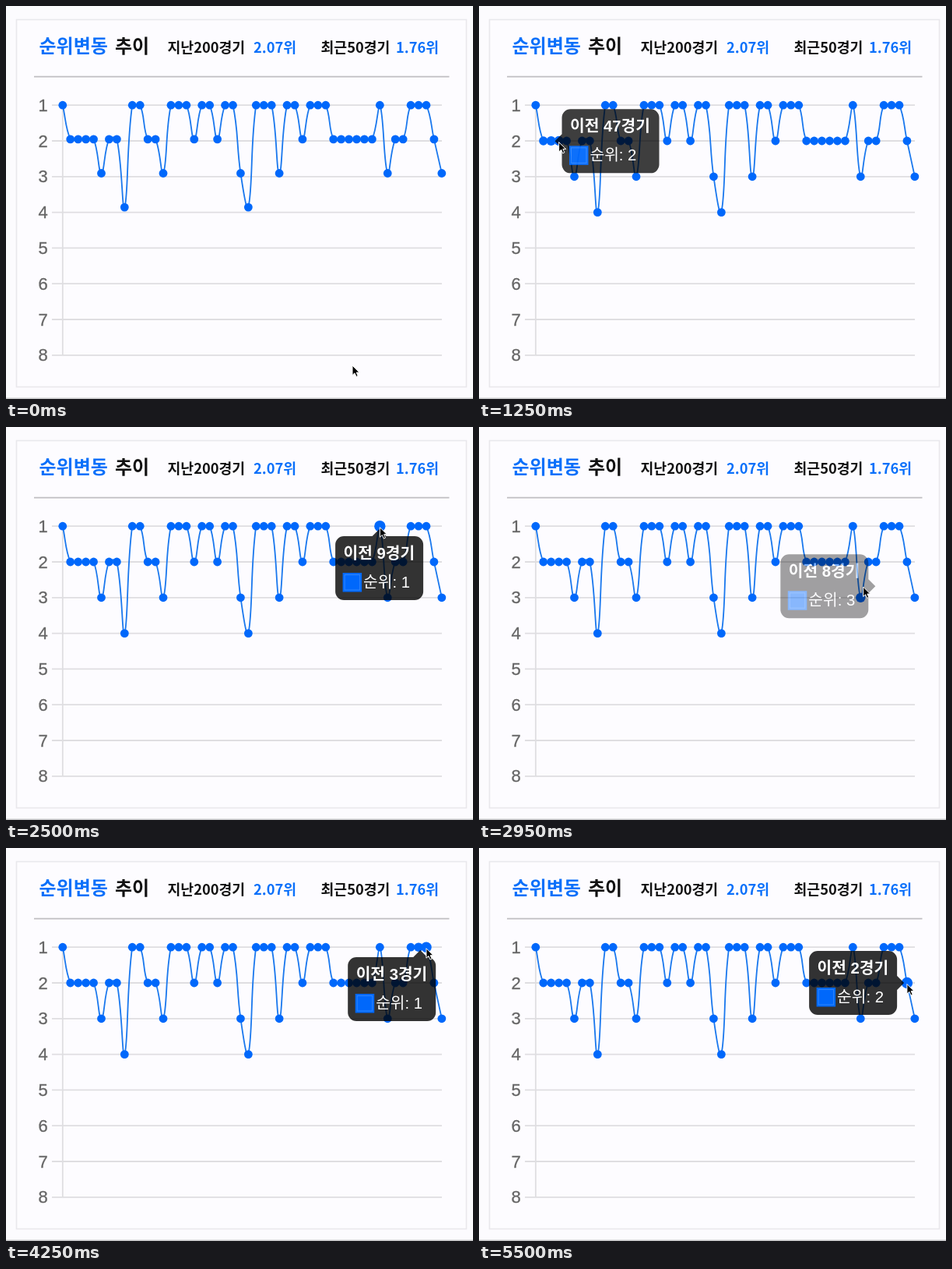
Recreate the animation shown at these times as an HTML page. Size 600 by 504 pixels, loop 5550 ms.

```html
<!DOCTYPE html>
<html lang="ko">
<head>
<meta charset="utf-8">
<style>
html, body { margin: 0; width: 100%; height: 100%; overflow: hidden; background: #fcfbfe; }
svg { display: block; }
text { font-family: "Noto Sans CJK KR", "Noto Sans CJK", sans-serif; }
.head { font-weight: 700; font-size: 18.3px; fill: #111; }
.big { font-size: 24px; }
.head .hot { fill: #0a70fa; }
.tick { font: 22px "Liberation Sans", Arial, sans-serif; fill: #666; stroke: #666; stroke-width: .3; text-anchor: end; }
#tip text { font: 20.3px "Liberation Sans", "Noto Sans CJK KR", "Noto Sans CJK", sans-serif; fill: #fff; }
#tip #title { font-weight: 700; }
</style>
</head>
<body>
<svg width="600" height="504" viewBox="0 0 600 504">
  <rect x="13.5" y="17.5" width="578" height="471" fill="#fdfcff" stroke="#e9e8ec" stroke-width="1.6"/>
  <path d="M0 503.3H600" stroke="#c4c4c6" stroke-width="1.4"/>
  <path d="M36 90.7H569.5" stroke="#bfbec1" stroke-width="1.7"/>
  <g class="head">
    <text class="big hot" x="42.5" y="60">순위변동</text>
    <text class="big" x="140" y="60">추이</text>
    <text x="207.5" y="60">지난200경기</text>
    <text class="hot" x="318" y="60">2.07위</text>
    <text x="404.5" y="60">최근50경기</text>
    <text class="hot" x="501" y="60">1.76위</text>
  </g>
  <g id="grid" stroke="#dfdee1" stroke-width="1.8"></g>
  <g id="ticks"></g>
  <path id="line" fill="none" stroke="#1a78ee" stroke-width="1.8"/>
  <g id="dots" fill="#0068fb"></g>
  <g id="tip">
    <path id="box" fill="#000" fill-opacity=".8"/>
    <rect x="9.5" y="47" width="24.5" height="24.5" fill="#0068fb"/>
    <rect x="12" y="49.5" width="19.5" height="19.5" fill="none" stroke="#2f86ff"/>
    <text id="title" x="10.5" y="29"></text>
    <text id="body" x="36" y="66"></text>
  </g>
  <path id="cursor" d="M0 0V12.5L3 9.8L5 14.4L7.2 13.4L5.2 9H9Z" fill="#000" stroke="#fff" stroke-linejoin="round"/>
</svg>
<script>
const LOOP = 5550, STEP = 50, TOP = 127.2, ROW = 45.8, CARET = 9, HIT = 8;
const ranks = [..."12222322411223111211211341113112111222222132211123"].map(Number);
const $ = id => document.getElementById(id);
const X = i => 72.8 + i * 9.94;
const Y = rank => TOP + (rank - 1) * ROW;
const mix = (a, b, p) => a + (b - a) * p;
const clamp = (v, lo, hi) => Math.min(hi, Math.max(lo, v));
const easeOut = x => 1 - (1 - clamp(x, 0, 1)) ** 4;

function set(el, attrs) {
  for (const k in attrs) el.setAttribute(k, attrs[k]);
}
function add(parent, tag, attrs, text = "") {
  const el = document.createElementNS("http://www.w3.org/2000/svg", tag);
  set(el, attrs);
  el.textContent = text;
  return $(parent).appendChild(el);
}

for (let n = 1; n <= 8; n++) {
  add("grid", "path", { d: `M59 ${Y(n)}H560` });
  add("ticks", "text", { class: "tick", x: 53.8, y: Y(n) + 7.5 }, n);
}
add("grid", "path", { d: `M72.8 ${TOP}V${Y(8)}` });
const dots = ranks.map((r, i) => add("dots", "circle", { cx: X(i) }));

// Cardinal spline handles, tension 0.4, kept inside the plot
const pts = ranks.map((r, i) => [X(i), Y(r)]);
const handles = pts.map((p, i) => {
  const a = pts[i - 1] || p, b = pts[i + 1] || p;
  const da = Math.hypot(p[0] - a[0], p[1] - a[1]);
  const db = Math.hypot(b[0] - p[0], b[1] - p[1]);
  const at = k => [p[0] + k * (b[0] - a[0]), clamp(p[1] + k * (b[1] - a[1]), TOP, Y(8))];
  return [at(-0.4 * da / (da + db)), at(0.4 * db / (da + db))];
});

// The pointer enters, then visits points of the chart: time, point (may lie past one)
const visits = [
  [800, 0], [1050, 1], [1350, 4], [1720, 9], [1830, 10], [1900, 10], [2200, 41], [2650, 41], [2850, 42],
  [3150, 43], [3400, 43], [3450, 44.4], [3600, 44.4], [3760, 45], [4250, 47], [4450, 47], [4620, 48], [LOOP, 48]
];
const stops = [[0, 445, 461], [700, 77, 135],
  ...visits.map(([t, i]) => [t, X(i), Y(ranks[Math.floor(i)]) + 1.5])];

function pointer(t) {
  const k = stops.findIndex(stop => stop[0] > t);
  const [t0, x0, y0] = stops[k - 1], [t1, x1, y1] = stops[k];
  const p = (t - t0) / (t1 - t0);
  return [mix(x0, x1, p), mix(y0, y1, p)];
}

function hit([x, y]) {
  const i = clamp(Math.round((x - X(0)) / (X(1) - X(0))), 0, ranks.length - 1);
  return Math.hypot(x - pts[i][0], y - pts[i][1]) < HIT ? i : -1;
}

// Every change of the hovered point, -1 for none
const hovers = [[0, -1]];
for (let t = 0; t < LOOP; t += 5) {
  const i = hit(pointer(t));
  if (i !== hovers.at(-1)[1]) hovers.push([t, i]);
}

function place(i) {
  const x = X(i), y = Y(ranks[i]), w = i > 40 ? 113 : 125, gap = 12.8, edge = 14.7;
  if (ranks[i] > 1) {
    const left = x < 316, side = left ? 0 : w;
    return { x: left ? x + gap : x - w - gap, y: y - 41, w,
      caret: `M${side} 32L${left ? -CARET : w + CARET} 41L${side} 50Z` };
  }
  const [bx, cx] = x < 36 + w / 2 ? [x - edge, 20]
    : x > 569 - w / 2 ? [x + edge - w, w - 20] : [x - w / 2, w / 2];
  return { x: bx, y: y + gap, w, caret: `M${cx - CARET} 0L${cx} ${-CARET}L${cx + CARET} 0Z` };
}

// Each change eases on from wherever the one before had got to
function hoverState(t) {
  const s = { x: 0, y: 0, alpha: 0, index: -1, glow: ranks.map(() => 0) };
  hovers.forEach(([start, i], k) => {
    if (start > t) return;
    const end = k + 1 < hovers.length ? Math.min(t, hovers[k + 1][0]) : t;
    const p = easeOut((end - start) / 400);
    if (i >= 0) {
      const to = place(i), q = s.alpha < 0.05 ? 1 : p;
      s.x = mix(s.x, to.x, q);
      s.y = mix(s.y, to.y, q);
      s.index = i;
    }
    s.alpha = mix(s.alpha, i < 0 ? 0 : 1, p);
    s.glow = s.glow.map((g, j) => mix(g, j === i ? 1 : 0, p));
  });
  return s;
}

function drawTip(s) {
  set($("tip"), { opacity: s.alpha, transform: `translate(${s.x} ${s.y})` });
  if (s.index < 0) return;
  const { w, caret } = place(s.index), r = 11, h = 82;
  const arc = (x, y) => `a${r} ${r} 0 0 1 ${x} ${y}`;
  set($("box"), { d: `M${r} 0H${w - r}${arc(r, r)}V${h - r}${arc(-r, r)}H${r}${arc(-r, -r)}V${r}${arc(r, -r)}Z${caret}` });
  $("title").textContent = `이전 ${50 - s.index}경기`;
  $("body").textContent = `순위: ${ranks[s.index]}`;
}

function draw() {
  const t = Math.floor(performance.now() % LOOP / STEP) * STEP;
  const grow = easeOut(0.534 + t / 1000);
  const at = ([x, y]) => `${x} ${mix(TOP, y, grow)}`;
  const s = hoverState(t);

  set($("line"), { d: pts.map((p, i) => i
    ? `C${at(handles[i - 1][1])} ${at(handles[i][0])} ${at(p)}` : `M${at(p)}`).join("") });
  dots.forEach((dot, i) => set(dot, { cy: mix(TOP, pts[i][1], grow), r: 5.4 + 1.8 * s.glow[i] }));
  drawTip(s);
  set($("cursor"), { transform: `translate(${pointer(t)})` });
  requestAnimationFrame(draw);
}
draw();
</script>
</body>
</html>
```
